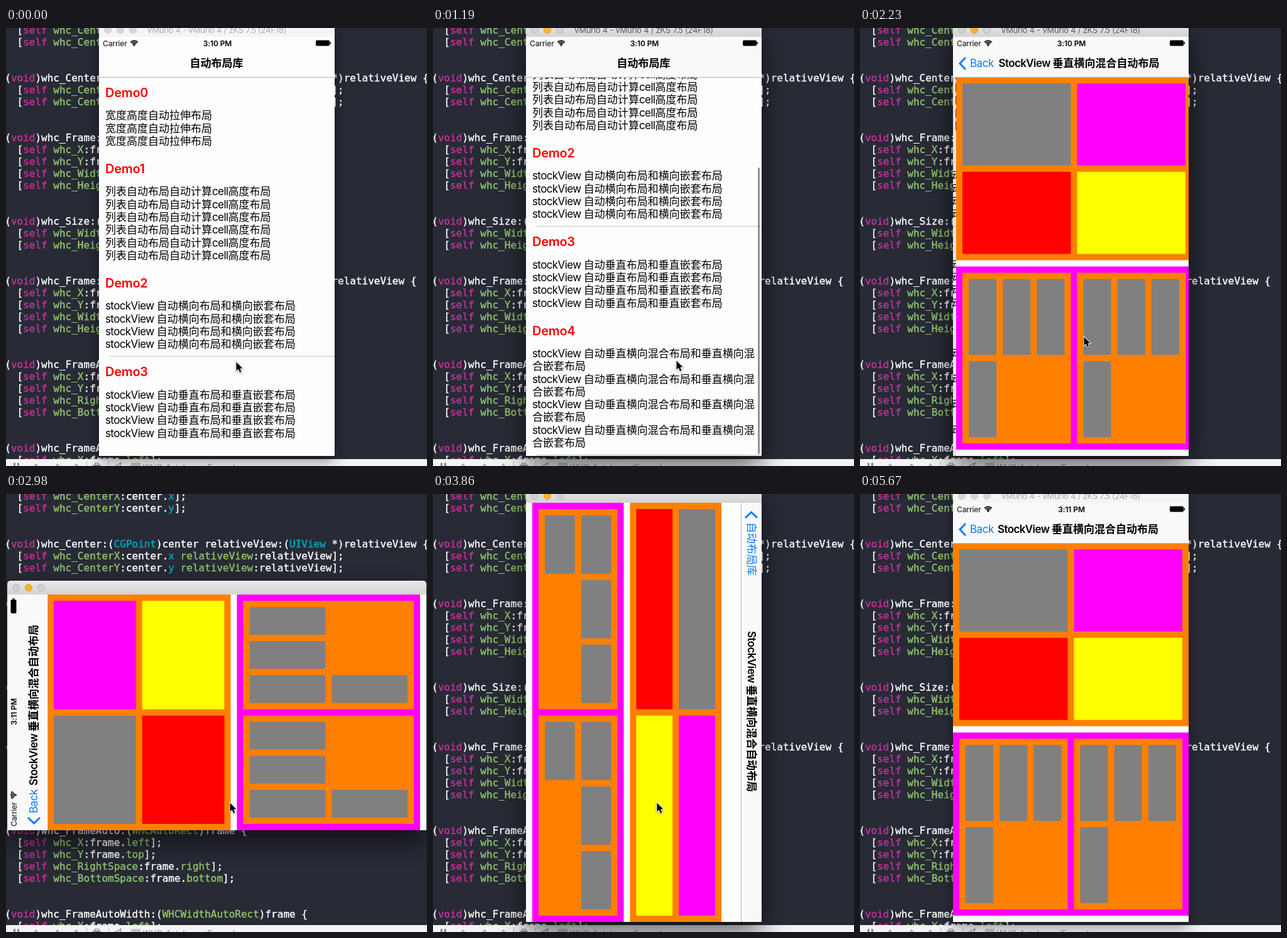
Animation of 670x697 px, one loop 5.77 s. Source, as an HTML page with a canvas:

```html
<!DOCTYPE html>
<html lang="en">
<head>
<meta charset="utf-8">
<title>Auto layout demo</title>
<style>
  html, body { margin: 0; width: 100%; height: 100%; overflow: hidden; background: #282a36; }
  canvas { display: block; }
</style>
</head>
<body>
<canvas id="stage" width="670" height="697"></canvas>
<script>
const ctx = document.getElementById('stage').getContext('2d');
const LOOP = 5770;
const SANS = 'Inter, "Noto Sans CJK SC", "Noto Sans CJK", sans-serif';
const MONO = '"DejaVu Sans Mono", monospace';
const ORANGE = '#ff8000', MAGENTA = '#ff00ff', GREY = '#808080', BLUE = '#0a7aff';
const MAX_SCROLL = 207;
const DEVICE_TITLE = 'vMurlo 4 - vMurlo 4 / zKS 7.5 (24F18)';
const PAGE_TITLE = 'StockView 垂直横向混合自动布局';

const CHANGES = [0, 300, 450, 600, 745, 890, 1040, 1190, 1340, 1490, 1640,
  1940, 2090, 2230, 2380, 2530, 2680, 2980, 3120, 3270, 3410,
  3860, 4010, 4150, 4300, 4750, 4900, 5040, 5190, 5670];

// Pointer path: time, x, y
const POINTER = [[300, 366.5, 531.5], [1190, 387.5, 529.5], [1340, 387.5, 529.5], [1490, 345, 506],
  [1640, 356.5, 491.5], [4600, 356.5, 491.5], [4750, 358.5, 491.5], [4900, 432, 556],
  [5040, 574, 682], [5190, 600, 720]];

const CODE = {
  0: '    [self whc_CenterX:center.x];',
  1: '    [self whc_CenterY:center.y];',
  4: '- (void)whc_Center:(CGPoint)center relativeView:(UIView *)relativeView {',
  5: '    [self whc_CenterX:center.x relativeView:relativeView];',
  6: '    [self whc_CenterY:center.y relativeView:relativeView];',
  9: '- (void)whc_Frame:(WHCRect)frame {',
  10: '    [self whc_X:frame.x];',
  11: '    [self whc_Y:frame.y];',
  12: '    [self whc_Width:frame.width];',
  13: '    [self whc_Height:frame.height];',
  16: '- (void)whc_Size:(CGSize)size {',
  17: '    [self whc_Width:size.width];',
  18: '    [self whc_Height:size.height];',
  21: '- (void)whc_Frame:(WHCRect)frame relativeView:(UIView *)relativeView {',
  22: '    [self whc_X:frame.x];',
  23: '    [self whc_Y:frame.y];',
  24: '    [self whc_Width:frame.width];',
  25: '    [self whc_Height:frame.height];',
  28: '- (void)whc_FrameAuto:(WHCAutoRect)frame {',
  29: '    [self whc_X:frame.left];',
  30: '    [self whc_Y:frame.top];',
  31: '    [self whc_RightSpace:frame.right];',
  32: '    [self whc_BottomSpace:frame.bottom];',
  35: '- (void)whc_FrameAutoWidth:(WHCWidthAutoRect)frame {',
  36: '    [self whc_X:frame.left];'
};

const repeat = (n, ...rows) => Array(n).fill(rows).flat();
const CELLS = [
  repeat(3, '宽度高度自动拉伸布局'),
  repeat(6, '列表自动布局自动计算cell高度布局'),
  repeat(4, 'stockView 自动横向布局和横向嵌套布局'),
  repeat(4, 'stockView 自动垂直布局和垂直嵌套布局'),
  repeat(4, 'stockView 自动垂直横向混合布局和垂直横向混', '合嵌套布局')
];

const clamp = v => Math.max(0, Math.min(1, v));
const mix = (a, b, p) => a + (b - a) * p;
const smooth = v => { const p = clamp(v); return p * p * (3 - 2 * p); };

function rect(x, y, w, h, color) {
  ctx.fillStyle = color;
  ctx.fillRect(x, y, w, h);
}

function pill(x, y, w, h, r, color) {
  ctx.fillStyle = color;
  ctx.beginPath();
  ctx.roundRect(x, y, w, h, r);
  ctx.fill();
}

function faded(alpha, draw) {
  if (alpha <= 0) return;
  ctx.save();
  ctx.globalAlpha *= alpha;
  draw();
  ctx.restore();
}

// Latin runs are tracked tighter than the Chinese ones
function label(str, x, y, size, color, weight = 400, tracking = 0) {
  ctx.font = `${weight} ${size}px ${SANS}`;
  ctx.fillStyle = color;
  for (const run of str.match(/[\u4e00-\u9fff]+|[^\u4e00-\u9fff]+/g)) {
    ctx.letterSpacing = run.charCodeAt(0) < 0x4e00 ? tracking + 'px' : '0px';
    ctx.fillText(run, x, y);
    x += ctx.measureText(run).width;
  }
  ctx.letterSpacing = '0px';
}

function tokenColor(word, line, at) {
  const call = line.includes('[');
  if (/^(void|self)$/.test(word)) return '#c2339a';
  if (/^(CG|UI)[A-Z]/.test(word)) return '#00a9c6';
  if (/^WHC/.test(word)) return '#8fc56c';
  if (line[at - 1] === '.') return /^[xy]$/.test(word) ? '#00a9c6' : '#8fc56c';
  if (call && line[at + word.length] === ':') return '#8fc56c';
  return '#ffffff';
}

function drawEditor() {
  rect(0, 0, 670, 697, '#282a36');
  ctx.font = `16px ${MONO}`;
  ctx.lineWidth = 0.4;
  const cw = ctx.measureText('0').width;
  for (const [row, line] of Object.entries(CODE)) {
    for (const m of line.matchAll(/\w+|[^\w\s]+/g)) {
      const x = -21 + m.index * cw, y = 9 + row * 19;
      ctx.fillStyle = ctx.strokeStyle = tokenColor(m[0], line, m.index);
      ctx.fillText(m[0], x, y);
      ctx.strokeText(m[0], x, y);
    }
  }
  drawToolbar();
}

function drawToolbar() {
  rect(0, 686, 670, 11, '#f4f4f4');
  rect(12, 692, 3, 5, '#8c8c8c');
  rect(18, 692, 3, 5, '#8c8c8c');
  rect(128, 690, 1, 7, '#b5b5b5');
  rect(163, 690, 1, 7, '#b5b5b5');
  rect(199, 692, 15, 5, '#c4c4c4');
  ctx.strokeStyle = '#858585';
  ctx.lineWidth = 1.2;
  ctx.strokeRect(138.5, 695.5, 12, 6);
  ctx.strokeRect(141.5, 692.5, 6, 4);
  ctx.beginPath();
  ctx.moveTo(172, 698); ctx.lineTo(183, 692); ctx.lineTo(181, 698);
  for (const x of [48, 82, 112]) { ctx.moveTo(x - 3, 698); ctx.lineTo(x, 694); ctx.lineTo(x + 3, 698); }
  ctx.stroke();
  label('WHC_AutoLayoutExample', 218, 704, 12.5, '#8a8a8a');
}

function drawWindow(win, active, titled) {
  ctx.save();
  ctx.shadowColor = active ? 'rgba(0,0,0,.6)' : 'rgba(0,0,0,.42)';
  ctx.shadowBlur = active ? 46 : 24;
  ctx.shadowOffsetY = active ? 18 : 8;
  pill(win.x, win.y - 22, win.w, win.h + 22, [5, 5, 0, 0], '#000');
  ctx.restore();

  const bar = ctx.createLinearGradient(0, win.y - 22, 0, win.y);
  bar.addColorStop(0, active ? '#e9e9e9' : '#f6f6f6');
  bar.addColorStop(1, active ? '#d3d3d3' : '#f4f4f4');
  pill(win.x, win.y - 22, win.w, 22, [5, 5, 0, 0], bar);
  const cy = win.y - 11;
  for (let i = 0; i < 3; i++) {
    const lit = active && i === 1;
    ctx.beginPath();
    ctx.arc(win.x + 14 + i * 20, cy, 5.5, 0, 7);
    ctx.fillStyle = lit ? '#fcb32c' : active ? '#d2d2d2' : '#d6d6d6';
    ctx.strokeStyle = lit ? '#dd9a22' : active ? '#b4b4b4' : '#cdcdcd';
    ctx.lineWidth = 1;
    ctx.fill();
    ctx.stroke();
  }
  if (titled) {
    ctx.textAlign = 'center';
    label(DEVICE_TITLE, win.x + win.w / 2, cy + 5, 13, active ? '#5a5a5a' : '#a9a9a9', 400, -0.25);
    ctx.textAlign = 'left';
  }
}

function drawList(scroll) {
  rect(0, 0, 375, 667, '#fdfdfd');
  let y = 64 - scroll;
  CELLS.forEach((rows, i) => {
    label('Demo' + i, 10, y + 32, 20, '#ff0000', 600, -0.3);
    rows.forEach((row, j) => label(row, 10, y + 67.3 + j * 20.29, 17, '#000', 400, -0.6));
    y += 60.2 + rows.length * 20.29;
    if (i === 2 || i === 4) rect(16, Math.round(y), 359, 1, '#c4c4c6');
  });
}

// Even grid with a 10px margin and gap; each cell is passed to draw
function grid(x, y, w, h, cols, rows, count, draw) {
  const cw = (w - 10 * (cols + 1)) / cols, ch = (h - 10 * (rows + 1)) / rows;
  for (let i = 0; i < count; i++) {
    draw(x + 10 + (i % cols) * (cw + 10), y + 10 + Math.floor(i / cols) * (ch + 10), cw, ch, i);
  }
}

function drawStacks(w, h) {
  rect(0, 0, w, h, '#fdfdfd');
  const half = (h - 84) / 2, colors = [GREY, MAGENTA, '#ff0000', '#ffff00'];
  rect(0, 64, w, half, ORANGE);
  grid(0, 64, w, half, 2, 2, 4, (x, y, cw, ch, i) => rect(x, y, cw, ch, colors[i]));
  rect(0, 74 + half, w, half, MAGENTA);
  grid(0, 74 + half, w, half, 2, 1, 2, (x, y, cw, ch) => {
    rect(x, y, cw, ch, ORANGE);
    grid(x, y, cw, ch, 3, 2, 4, (gx, gy, gw, gh) => rect(gx, gy, gw, gh, GREY));
  });
}

function drawStatus(w, clock) {
  label('Carrier', 6, 14.5, 12, '#000', 400, -0.1);
  ctx.strokeStyle = '#000';
  ctx.lineWidth = 1.6;
  for (const r of [3.6, 6, 8.4]) {
    ctx.beginPath();
    ctx.arc(56, 14.5, r, -Math.PI * 0.75, -Math.PI * 0.25);
    ctx.stroke();
  }
  ctx.beginPath();
  ctx.arc(56, 13.5, 1.4, 0, 7);
  ctx.fillStyle = '#000';
  ctx.fill();
  ctx.textAlign = 'center';
  label(clock, w / 2 + 1, 14.5, 12, '#000', 600, -0.1);
  ctx.textAlign = 'left';
  pill(w - 30, 5.5, 22, 9, 2, '#000');
  pill(w - 7.5, 8, 1.6, 4, 0.8, '#000');
}

// pushed: list to detail, 0..1; land: portrait to landscape, 0..1
function drawNav(w, s, pushed, land, slide) {
  const h = mix(64, 32, land), base = mix(48, 22, land);
  rect(0, 0, w, h, s.scroll > 0 || pushed ? '#f9f9f9' : '#fdfdfd');
  rect(0, h, w, 1, '#b2b2b2');
  faded(1 - land, () => drawStatus(w, s.clock));
  faded(1 - pushed, () => label('自动布局库', 144.5 - pushed * 112, base, 17, '#000', 600));
  faded(pushed, () => {
    const x = mix(9, 13, land), cy = base - 5.5;
    ctx.strokeStyle = BLUE;
    ctx.lineWidth = 3;
    ctx.beginPath();
    ctx.moveTo(x + 11, cy - 9.5);
    ctx.lineTo(x + 2, cy);
    ctx.lineTo(x + 11, cy + 9.5);
    ctx.stroke();
    faded(1 - land, () => label('Back', x + 18, base, 17, BLUE, 400, -0.5));
    faded(land, () => label('自动布局库', x + 18, base, 17, BLUE));
    label(PAGE_TITLE, mix(71, 204, land) + slide * 0.3, base, 17, '#000', 600, -0.6);
  });
}

function drawScreen(s) {
  const { w, h } = s;
  if (!s.detail) {
    drawList(s.scroll);
    if (s.barAlpha) {
      const top = 67 + s.scroll / MAX_SCROLL * 141;
      pill(369, top, 3, 456, 1.5, `rgba(0,0,0,${0.42 * s.barAlpha})`);
    }
    drawNav(w, s, 0, 0, 0);
    return;
  }
  const pushed = 1 - s.slide / 375;
  if (s.slide > 0) {
    ctx.save();
    ctx.translate(-112 * pushed, 0);
    drawList(s.scroll);
    ctx.restore();
    rect(0, 0, w, h, `rgba(0,0,0,${0.1 * pushed})`);
  }
  ctx.save();
  ctx.translate(s.slide, 0);
  drawStacks(w, h);
  ctx.restore();
  drawNav(w, s, pushed, s.land, s.slide);
}

function drawPointer(t) {
  if (t >= 5190) return;
  const i = POINTER.findIndex(k => k[0] > t);
  const b = POINTER[i], a = POINTER[Math.max(0, i - 1)];
  const p = a === b ? 0 : (t - a[0]) / (b[0] - a[0]);
  ctx.save();
  ctx.translate(mix(a[1], b[1], p), mix(a[2], b[2], p));
  ctx.beginPath();
  for (const [x, y] of [[0, 0], [0, 14], [3.2, 11], [5.6, 16.4], [8, 15.4], [5.7, 10.2], [10, 10]]) ctx.lineTo(x, y);
  ctx.closePath();
  ctx.shadowColor = 'rgba(0,0,0,.4)';
  ctx.shadowBlur = 3;
  ctx.shadowOffsetY = 1;
  ctx.lineWidth = 2;
  ctx.strokeStyle = '#fff';
  ctx.stroke();
  ctx.shadowColor = 'transparent';
  ctx.fillStyle = '#000';
  ctx.fill();
  ctx.restore();
}

function stateAt(t) {
  const sideways = t >= 2980 && t < 3860;
  const turn = sideways ? smooth((t - 2980) / 430) : t >= 3860 ? smooth((t - 3860) / 440) : 1;
  const land = sideways ? turn : t >= 3860 ? 1 - turn : 0;
  const slide = 5 * 8 ** ((2230 - t) / 145);
  return {
    sideways, land,
    angle: (sideways ? -1 : 1) * (1 - turn) * Math.PI / 2,
    w: mix(375, 667, land),
    h: mix(667, 375, land),
    detail: t >= 1940,
    slide: slide < 0.4 ? 0 : Math.min(375, slide),
    scroll: MAX_SCROLL * smooth((t - 300) / 880),
    barAlpha: t < 450 || t >= 1640 ? 0 : t >= 1490 ? 0.4 : 1,
    clock: t < 2680 ? '3:10 PM' : '3:11 PM',
    active: t >= 300 && t < 5670,
    titled: t !== 2980 && t !== 3860
  };
}

function render(t) {
  const s = stateAt(t);
  const win = s.sideways ? { x: 2, y: 160, w: 667, h: 375 } : { x: 148, y: 14, w: 375, h: 667 };
  drawEditor();
  drawWindow(win, s.active, s.titled);
  ctx.save();
  ctx.beginPath();
  ctx.rect(win.x, win.y, win.w, win.h);
  ctx.clip();
  rect(win.x, win.y, win.w, win.h, '#000');
  ctx.translate(win.x + win.w / 2, win.y + win.h / 2);
  ctx.rotate(s.angle);
  ctx.translate(-s.w / 2, -s.h / 2);
  drawScreen(s);
  ctx.restore();
  drawPointer(t);
}

const start = performance.now();
let shown = -1;
function tick() {
  const t = (performance.now() - start) % LOOP;
  const now = CHANGES.findLast(c => c <= t);
  if (now !== shown) render(shown = now);
  requestAnimationFrame(tick);
}
tick();
</script>
</body>
</html>
```
